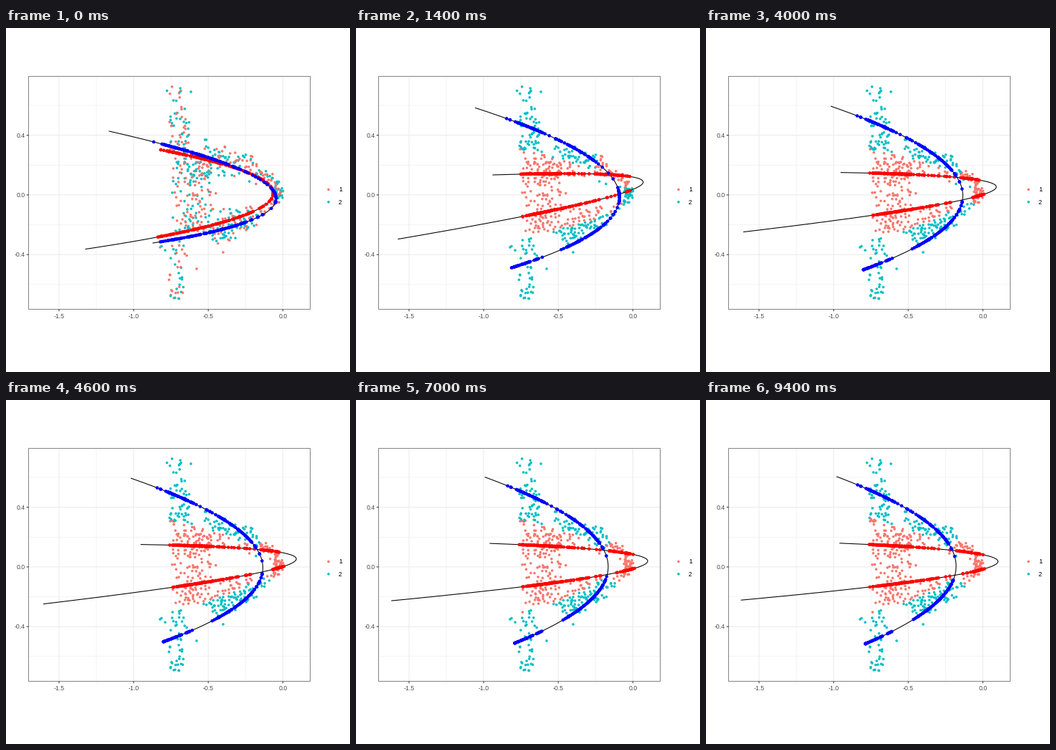
Recreate the animation shown at these times as a matplotlib script. Size 480 px wide and 480 px high, loop 10 s.

```python
import numpy as np
import matplotlib.pyplot as plt
from matplotlib.animation import FuncAnimation
from matplotlib.patches import Rectangle

plt.rcParams["path.snap"] = False

SIZE, DPI = 480, 72
STEP_MS, FRAMES = 100, 100
SALMON, TEAL = "#F8766D", "#00BFC4"
GRID, BORDER, LABEL = "#EBEBEB", "#333333", "#4D4D4D"
LEFT, RIGHT, TOP, BOTTOM = 31.5, 424.5, 67.5, 392.5
SMALL, LARGE = 3.55**2, 4.6**2
REFITS = 7
# Reassignments and refits take turns, in tenths of a second
CHANGES = [*range(7, 29, 7), *range(34, 95, 6)]

rng = np.random.default_rng(12)


def to_px(x):
    return 386.3 + 208.2 * x


def to_py(y):
    return 232.9 - 208.2 * y


def parabola(start, apex, end):
    """Quadratic curve from start to end whose rightmost point is apex."""
    (x0, y0), (xm, ym), (x2, y2) = start, apex, end
    ratio = np.sqrt((xm - x0) / (xm - x2))
    tm = ratio / (1 + ratio)
    k = (xm - x0) / tm**2
    qy = (ym - y0 * (1 - tm) ** 2 - y2 * tm**2) / (2 * tm * (1 - tm))
    t = np.linspace(0, 1, 700)
    x = xm - k * (t - tm) ** 2
    y = y0 * (1 - t) ** 2 + 2 * t * (1 - t) * qy + y2 * t**2
    return np.column_stack([x, y])


def converge(initial, first, last, power):
    """Initial curve, then refits that ease from first to last."""
    first, last = np.array(first), np.array(last)
    rest = (1 - np.linspace(0, 1, REFITS)) ** power
    return [parabola(*initial)] + [parabola(*(last + (first - last) * r)) for r in rest]


def box(n, x0, x1, y0, y1):
    return rng.uniform((x0, y0), (x1, y1), (n, 2))


def column(n, x, spread, y0, y1):
    return np.column_stack([rng.normal(x, spread, n), rng.uniform(y0, y1, n)])


def band(n, x0, y0, x1, y1, spread):
    f = rng.uniform(0, 1, n)
    offset = np.clip(rng.normal(0, spread, n), -2 * spread, 2 * spread)
    return np.column_stack([x0 + f * (x1 - x0), y0 + f * (y1 - y0) + offset])


def nearest(points, curve):
    """Squared distance to the curve and the closest curve point."""
    d2 = ((points[:, None, :] - curve[None]) ** 2).sum(axis=2)
    return d2.min(axis=1), curve[d2.argmin(axis=1)]


outliers = [(258, 89), (215, 306), (217, 304.5), (303, 313), (266, 336)]
points = np.vstack([
    outliers,
    column(22, 238, 7, 81, 130),                   # upper fin
    box(44, 228, 257, 128, 172),
    column(44, 239, 8, 293, 378),                  # lower fin
    column(95, 260, 12, 176, 287),                 # body
    box(75, 231, 287, 172, 288),
    box(24, 268, 308, 180, 206),
    box(20, 284, 324, 252, 280),
    band(72, 276, 171, 350, 198, 10),              # upper edge
    band(30, 350, 200, 380, 219, 5),
    band(78, 283, 290, 350, 263, 9),               # lower edge
    band(14, 350, 260, 376, 241, 4),
    np.minimum(rng.normal((379, 231), (3.5, 6), (34, 2)), (386.5, 246)),
])
rng.shuffle(points)
labels = rng.integers(0, 2, len(points))

reds = converge([(216, 170), (373, 230.5), (111, 308.5)],
                [(191, 205), (400.7, 215), (59, 294.5)],
                [(186.8, 199.8), (407.4, 225.3), (49.2, 279.2)], 2.6)
blues = converge([(144, 144), (377, 238), (205, 300)],
                 [(166.7, 111.5), (367.7, 236), (217, 334.5)],
                 [(182.6, 107), (349, 232), (222.6, 340)], 1.7)
fits = list(zip(reds, blues))

assignments, projections = [labels], []
for red, blue in fits:
    (d_red, on_red), (d_blue, on_blue) = nearest(points, red), nearest(points, blue)
    current = assignments[-1]
    projections.append((on_red[current == 0], on_blue[current == 1]))
    assignments.append((d_blue < d_red).astype(int))

fig = plt.figure(figsize=(SIZE / DPI, SIZE / DPI), dpi=DPI, facecolor="white")
ax = fig.add_axes([0, 0, 1, 1])
ax.set(xlim=(0, SIZE), ylim=(SIZE, 0))
ax.axis("off")


def segment(x, y, color=GRID, width=1.07):
    ax.plot(x, y, color=color, lw=width, zorder=0, solid_capstyle="butt")


def label(x, y, text, align, color=LABEL):
    ax.text(x, y, text, ha=align, va="baseline", color=color,
            family="Liberation Sans", size=8.8)


for x in to_px(np.array([-1.25, -0.75, -0.25])):
    segment([x, x], [TOP, BOTTOM], width=0.53)
for y in to_py(np.array([-0.6, -0.2, 0.2, 0.6])):
    segment([LEFT, RIGHT], [y, y], width=0.53)
for v in (-1.5, -1.0, -0.5, 0.0):
    x = to_px(v)
    segment([x, x], [TOP, BOTTOM])
    segment([x, x], [BOTTOM, BOTTOM + 2.75], BORDER)
    label(x, 404.8, f"{v:.1f}", "center")
for v in (-0.4, 0.0, 0.4):
    y = to_py(v)
    segment([LEFT, RIGHT], [y, y])
    segment([LEFT - 2.75, LEFT], [y, y], BORDER)
    label(26.4, y + 3, f"{v:.1f}", "right")
ax.add_patch(Rectangle((LEFT, TOP), RIGHT - LEFT, BOTTOM - TOP, fill=False,
                       ec=BORDER, lw=0.6, zorder=7))

key_y = (225.5, 242.8)
ax.scatter([450, 450], key_y, s=SMALL, c=[SALMON, TEAL], lw=0)
for y, name in zip(key_y, "12"):
    label(463.8, y + 3, name, "left", "black")

dots = ax.scatter(*points.T, s=SMALL, lw=0, zorder=2)
lines = [ax.plot([], [], color="black", lw=1.07, zorder=3)[0] for _ in range(2)]
marks = ax.scatter([], [], s=LARGE, lw=0, zorder=4)
palette = np.array([SALMON, TEAL])


def update(frame):
    done = sum(frame >= change for change in CHANGES)
    fit = done // 2
    dots.set_facecolors(palette[assignments[(done + 1) // 2]])
    for line, curve in zip(lines, fits[fit]):
        line.set_data(*curve.T)
    on_red, on_blue = projections[fit]
    marks.set_offsets(np.vstack([on_red, on_blue]))
    marks.set_facecolors(["red"] * len(on_red) + ["blue"] * len(on_blue))
    return [dots, *lines, marks]


anim = FuncAnimation(fig, update, frames=FRAMES, interval=STEP_MS,
                     repeat=True, repeat_delay=0, blit=False)
plt.show()
```
